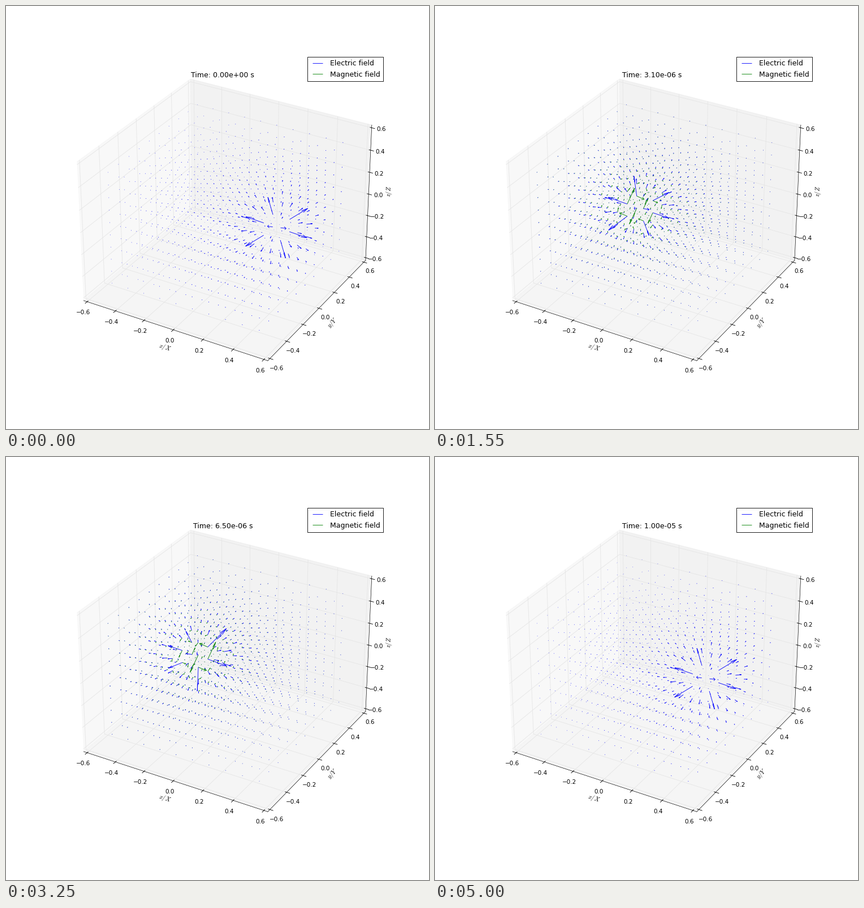
These frames come from a looping animation (748x748 px, 5.05 s). A matplotlib script:

```python
import numpy as np
import matplotlib.pyplot as plt
from matplotlib.animation import FuncAnimation
from matplotlib.collections import LineCollection
from mpl_toolkits.mplot3d import proj3d

plt.style.use("classic")
plt.rcParams.update({
    "font.family": "DejaVu Sans",
    "figure.facecolor": "white",
    "savefig.facecolor": "white",
    "savefig.dpi": "figure",
})

SIZE = 748
FRAMES, INTERVAL = 101, 50
STEP = 1e-7            # simulated seconds per frame
PERIOD = 1e-5
AMPLITUDE = 1 / 3      # swing of the charge along x
STRENGTH = 1.236e-3    # arrow length at unit distance
HEAD_RATIO = 0.3
HEAD_ANGLE = np.radians(15)
LIMIT = 0.625

axis_points = np.linspace(-0.5, 0.5, 10)
GRID = np.stack(np.meshgrid(axis_points, axis_points, axis_points),
                axis=-1).reshape(-1, 3)


class Field(LineCollection):
    """Arrows already projected to the plane of the 3D axes."""

    def do_3d_projection(self):
        return 0


def arrow_lines(vectors):
    """Shafts and two head strokes as 3D segments."""
    tips = GRID + vectors
    x, y, z = vectors.T
    flat = np.hypot(x, y)
    safe = np.where(flat > 0, flat, 1)
    # vectors turned a quarter within their own vertical plane
    turned = np.stack([-x * z / safe, -y * z / safe, flat], axis=1)
    c, s = np.cos(HEAD_ANGLE), np.sin(HEAD_ANGLE)
    ends = [GRID] + [tips - HEAD_RATIO * (c * vectors + sign * s * turned)
                     for sign in (1, -1)]
    return np.concatenate([np.stack([tips, end], axis=1) for end in ends])


def project(lines):
    x, y, _ = proj3d.proj_transform(*lines.reshape(-1, 3).T, view)
    return np.stack([x, y], axis=1).reshape(-1, 2, 2)


def fields(t):
    phase = 2 * np.pi * t / PERIOD
    r = GRID - [AMPLITUDE * np.cos(phase), 0, 0]
    electric = STRENGTH * r / np.linalg.norm(r, axis=1, keepdims=True) ** 3
    magnetic = np.cross([-np.sin(phase), 0, 0], electric)
    return electric, magnetic


fig = plt.figure(figsize=(12, 12), dpi=SIZE / 12)
ax = fig.add_subplot(projection="3d", computed_zorder=False)
ax.set(xlim=(-LIMIT, LIMIT), ylim=(-LIMIT, LIMIT), zlim=(-LIMIT, LIMIT),
       xlabel="$x/X$", ylabel="$y/Y$", zlabel="$z/Z$")
view = ax.get_proj()

electric_lines = Field([], colors="b", label="Electric field", zorder=3)
magnetic_lines = Field([], colors="g", label="Magnetic field", zorder=2)
for lines in (electric_lines, magnetic_lines):
    ax.add_collection(lines, autolim=False)
ax.legend()
title = ax.set_title("")
title.set_y(0.92)


def update(frame):
    t = frame * STEP
    electric, magnetic = fields(t)
    electric_lines.set_segments(project(arrow_lines(electric)))
    magnetic_lines.set_segments(project(arrow_lines(magnetic)))
    title.set_text(f"Time: {t:.2e} s")
    return electric_lines, magnetic_lines, title


anim = FuncAnimation(fig, update, frames=FRAMES, interval=INTERVAL,
                     repeat=True, repeat_delay=0)
plt.show()
```
